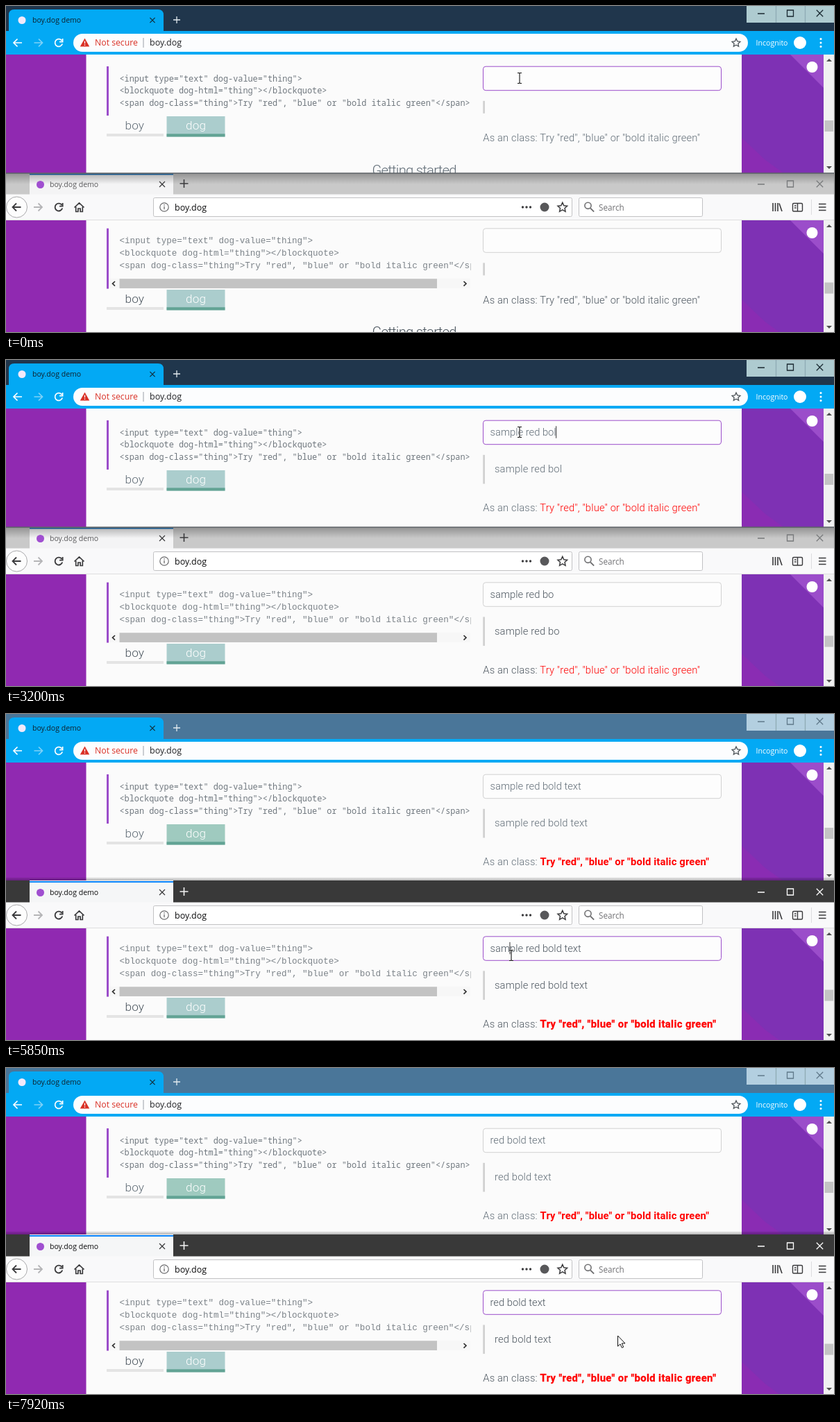
An HTML page for the animation above (8000 ms loop, 1193x470 px).

```html
<!DOCTYPE html>
<html lang="en">
<head>
<meta charset="utf-8">
<title>boy.dog demo</title>
<style>
html, body { margin: 0; width: 100%; height: 100%; overflow: hidden; background: #fbfbfb; }
svg { display: block; width: 100vw; height: 100vh; }
text { white-space: pre; }
.ui { font-family: "Open Sans", "Noto Sans", sans-serif; }
.body { font: 300 14.75px Roboto, sans-serif; letter-spacing: .1475px; }
.field { font: 300 14.75px Roboto, sans-serif; }
.head { font: 300 20.24px Roboto, sans-serif; letter-spacing: -.74px; }
.tab { font: 300 17.2px Roboto, sans-serif; letter-spacing: .17px; }
.mono { font: 11.87px "Noto Sans Mono", monospace; }
.courier { font: 12.55px "Liberation Mono", monospace; }
.line { fill: none; stroke-width: 1.3; }
</style>
</head>
<body>
<svg id="stage" viewBox="0 0 1193 470" preserveAspectRatio="none"></svg>
<script>
const LOOP = 8000;
const PHRASE = 'sample red bold text';
const HINT = 'Try "red", "blue" or "bold italic green"';
const CODE = [
  '<input type="text" dog-value="thing">',
  '<blockquote dog-html="thing"></blockquote>',
  `<span dog-class="thing">${HINT}</span>`
];

// Key press times: typing in the upper window, mirrored below; deleting the other way round.
const topKeys = [680, 1000, 1160, 1320, 1490, 1650, 1770, 1920, 2070, 2230, 2380,
  2930, 3080, 3200, 3350, 3500, 3700, 3840, 4260, 4380];
const lowKeys = [840, ...topKeys.slice(2, 11), 2530, ...topKeys.slice(12, 18), 3990, 4380, 4380];
const lowCuts = [6990, 7110, 7230, 7380, 7500, 7620, 7770];
const topCuts = [...lowCuts.slice(1), 7920];
const FOCUS = 5850;

// time, x, y, shape
const mouse = [
  [0, 740, 104, 'beam'], [5310, 741, 150, 'arrow'], [5450, 735, 238, 'arrow'],
  [5580, 730, 310, 'arrow'], [5700, 728, 348, 'beam'],
  [6100, 812, 368, 'arrow'], [6250, 881.5, 386, 'arrow']
];

const esc = s => s.replace(/&/g, '&amp;').replace(/</g, '&lt;');
const rect = (x, y, w, h, fill, more = '') =>
  `<rect x="${x}" y="${y}" width="${w}" height="${h}" fill="${fill}" ${more}/>`;
const text = (x, y, s, cls, fill, more = '') =>
  `<text x="${x}" y="${y}" class="${cls}" fill="${fill}" ${more}>${esc(s)}</text>`;
const ui = (x, y, s, size, fill, more = '') =>
  text(x, y, s, 'ui', fill, `font-size="${size}" ${more}`);
const line = (d, stroke, more = '') => `<path class="line" d="${d}" stroke="${stroke}" ${more}/>`;
const dot = (x, y, r, fill) => `<circle cx="${x}" cy="${y}" r="${r}" fill="${fill}"/>`;
const cross = (x, y, r) => `M${x - r},${y - r}l${2 * r},${2 * r}m0,${-2 * r}l${-2 * r},${2 * r}`;
const plus = (x, y, r) => `M${x - r},${y}h${2 * r}M${x},${y - r}v${2 * r}`;
const back = (x, y) => `M${x + 6},${y}h-12m5.5,-5.5l-5.5,5.5l5.5,5.5`;
const forward = (x, y) => `M${x - 6},${y}h12m-5.5,-5.5l5.5,5.5l-5.5,5.5`;
const reload = (x, y) => `M${x + 4.5},${y - 3}A5.4,5.4 0 1 0 ${x + 5.2},${y + 1.5}M${x + 5.6},${y - 6}v4.6h-4.6`;

function star(x, y, r) {
  const pts = Array.from({ length: 10 }, (_, i) => {
    const a = i * Math.PI / 5, q = i % 2 ? r * .48 : r;
    return `${(x + q * Math.sin(a)).toFixed(2)},${(y - q * Math.cos(a)).toFixed(2)}`;
  });
  return `M${pts.join('L')}Z`;
}

const winGlyphs = y =>
  `M1083,${y + .5}h10M1125.5,${y - 4.5}h9v9h-9z${cross(1172.5, y, 4.7)}`;

function page(id, top, bottom, dy, o) {
  const h = bottom - top;
  const tabs = o.tabs;
  return `
    ${rect(0, top, 1193, h, '#fbfbfb')}
    ${rect(0, top, 115.5, h, '#9029b1')}
    ${rect(1060, top, 118, h, '#7e31b4')}
    <path d="M1060,${190 + dy}l34,32l36,26h-70z" fill="#8a2cb3"/>
    <path d="M1130,${top}h48v48z" fill="#9b4dca"/>
    ${dot(1161.5, top + 18, 8, '#fff')}
    ${rect(1178, top, 15, h, '#f1f1f1')}
    <path d="M1182,${top + 10}l4,-4l4,4z" fill="#505050"/>
    <path d="M1182,${o.down}l4,4l4,-4z" fill="#505050"/>
    ${rect(1179.5, 165 + dy, 12.5, 16, '#c4c4c4', `id="${id}Thumb"`)}
    ${rect(145, 87 + dy, 3, o.preH, '#9b4dca')}
    <svg x="0" y="0" width="669.5" height="470">
      ${CODE.map((s, i) => text(163.5, 108.6 + dy + i * 17.8 + o.codeShift, s, o.font, o.codeInk)).join('')}
    </svg>
    ${rect(145, tabs + 25, 82, 4, '#e4e4e4')}
    ${rect(231.5, tabs, 84, 29.5, '#abcdcd', `id="${id}Tab"`)}
    ${rect(231.5, tabs + 25.3, 84, 4.2, '#62a394')}
    ${text(171.5, tabs + 19, 'boy', 'tab', o.ink)}
    ${text(259, tabs + 19, 'dog', 'tab', '#fff')}
    ${rect(687.5, 87.2 + dy, 343, 34.5, '#fdfdfd', `rx="3.7" stroke="#d1d1d1" id="${id}Box"`)}
    ${text(697.5, 109 + dy, '', 'field', o.ink, `id="${id}Field"`)}
    <path id="${id}Wave" fill="none" stroke="#e53935" stroke-width="1"/>
    ${rect(697, 95.3 + dy, 1, 17.4, '#333', `id="${id}Caret"`)}
    ${rect(687.2, 136.8 + dy, 2.8, 18, '#d1d1d1', `id="${id}Bar"`)}
    ${text(704, 162.4 + dy, '', 'body', o.ink, `id="${id}Quote"`)}
    <g id="${id}Flow">
      <text x="687.3" y="${195 + dy}" class="body" fill="${o.ink}">As an class: <tspan id="${id}Hint">${HINT}</tspan></text>
      ${text(527.5, 243.8 + dy, 'Getting started', 'head', o.ink)}
    </g>`;
}

function topWindow() {
  return `
    ${rect(0, 0, 1193, 37, '#20364c', 'id="topTitle"')}
    <path d="M4,37V13q0,-8 8,-8H219q8,0 8,8V37z" fill="#03a9f4"/>
    ${rect(0, 36, 1193, 34, '#03a9f4')}
    ${dot(23, 20.5, 5.5, '#f3e9fa')}
    ${ui(38, 24.3, 'boy.dog demo', 10.55, '#10222e')}
    ${line(cross(211, 20.5, 3.6), '#12303f')}
    ${line(plus(246, 20, 5), '#e3ebf0')}
    ${rect(1067, 0, 126, 24, '#aecbd0', 'id="winBtns"')}
    ${line('M1109.5,0v24M1151.5,0v24', '#8fabb4', 'stroke-width="1"')}
    <path class="line" id="topGlyphs" d="${winGlyphs(10.5)}"/>
    ${line(back(17, 53), '#fff', 'style="stroke-width:1.7"')}
    ${line(forward(46.5, 53), '#7fd2f8', 'style="stroke-width:1.7"')}
    ${line(reload(76, 53), '#fff', 'style="stroke-width:1.7"')}
    ${rect(97, 40, 972, 26, '#fcfdfe', 'rx="13"')}
    <path d="M113.5,46.5l6.7,12h-13.4z" fill="#d93025"/>
    ${line('M113.5,50.6v3.6M113.5,55.4v1.5', '#fff')}
    ${ui(128, 57.4, 'Not secure', 12.25, '#d93025')}
    ${rect(197.5, 46, 1, 14, '#9aa0a6')}
    ${ui(207, 57.4, 'boy.dog', 12.5, '#202124')}
    ${line(star(1052, 53.3, 6.2), '#4d5358')}
    ${ui(1080.5, 56.8, 'Incognito', 10.6, '#fff')}
    ${dot(1144, 53, 9, '#fff')}
    ${[47.5, 53, 58.5].map(y => dot(1174, y, 1.5, '#fff')).join('')}
    ${page('top', 70, 241, 0, {
      tabs: 159, preH: 71, down: 231, font: 'mono', codeShift: 0,
      ink: '#606c76', codeInk: '#6f777e'
    })}`;
}

function lowWindow() {
  const ink = '#3b3b3d';
  return `
    <g id="lowOff">
      ${rect(0, 241, 1193, 31, '#c9c9c9')}
      ${rect(34, 242, 207, 30, '#f4f4f5')}
      ${rect(34, 242, 207, 1.5, '#1c72b8')}
      ${rect(0, 242, 1193, 15, 'url(#shade)')}
      ${rect(0, 240.3, 1193, 1.6, '#5d6266')}
    </g>
    <g id="lowOn">
      ${rect(0, 235.5, 1193, 4.5, 'url(#edge)')}
      ${rect(0, 240, 1193, 32, '#393939')}
      ${rect(34, 240, 207, 32, '#f5f6f7')}
      ${rect(34, 241, 207, 2, '#0a84ff')}
    </g>
    ${dot(49.5, 257.5, 5.5, '#a04fd0')}
    ${ui(63, 261.3, 'boy.dog demo', 10.55, '#555', 'id="lowTitle"')}
    ${line(cross(225, 257, 4), '#3c3c3e')}
    <path class="line" id="lowPlus" d="${plus(256.5, 256, 6)}" style="stroke-width:1.6"/>
    <path class="line" id="lowGlyphs" d="${winGlyphs(256.5)}"/>
    ${rect(0, 271.5, 1193, 38, '#f9f9fa')}
    ${rect(0, 308.3, 1193, 1, '#d4d4d6')}
    <circle cx="15.5" cy="290" r="15" fill="#fdfdfd" stroke="#a9a9ab"/>
    ${line(back(15.5, 290), ink, 'style="stroke-width:1.8"')}
    ${line(forward(46, 290), '#b5b5b7', 'style="stroke-width:1.8"')}
    ${line(reload(76, 290), ink, 'style="stroke-width:1.9"')}
    ${line('M98.5,290.5l7,-6.5l7,6.5M100.7,289.5v7h3.2v-4.5h3.2v4.5h3.2v-7', ink, 'style="stroke-width:1.7"')}
    ${rect(212.5, 276.5, 603, 27, '#fff', 'rx="2" stroke="#c2c2c4"')}
    <circle cx="228" cy="290" r="6.2" fill="none" stroke="#6a6a6c" stroke-width="1.2"/>
    ${line('M228,288.8v4.4M228,286v1.5', '#6a6a6c')}
    ${ui(243, 295.2, 'boy.dog', 12.5, '#0c0c0d')}
    ${[744.5, 750, 755.5].map(x => dot(x, 290, 1.7, ink)).join('')}
    ${dot(776, 290, 6.5, '#58585a')}
    ${line(star(801.8, 290.5, 7.2), ink, 'style="stroke-width:1.5"')}
    ${rect(825.5, 276.5, 178, 27, '#fff', 'rx="2" stroke="#c2c2c4"')}
    <circle cx="838.5" cy="287.8" r="4.6" fill="none" stroke="#707072" stroke-width="1.6"/>
    ${line('M842,291.5l5.2,5.2', '#707072', 'style="stroke-width:1.8"')}
    ${ui(854, 295, 'Search', 11.7, '#707073')}
    ${line('M1105,284v12M1108.5,284v12M1112,284v12M1114,284.5l4,11.5', ink, 'style="stroke-width:1.6"')}
    ${line('M1135,284.5h11q1.5,0 1.5,1.5v8.500q0,1.500 -1.500,1.500h-11q-1.500,0 -1.500,-1.500v-8.500q0,-1.500 1.500,-1.500zM1140.500,284.500v11.500M1136,288h2.500M1136,291h2.500', ink, 'style="stroke-width:1.4"')}
    ${rect(1160, 279, 1, 22, '#dcdcde')}
    ${line('M1171,285.5h10.500M1171,290h10.500M1171,294.500h10.500', ink, 'style="stroke-width:1.7"')}
    ${page('low', 309, 470, 233.6, {
      tabs: 409, preH: 87, down: 461, font: 'courier', codeShift: 0.2,
      ink: '#4b555e', codeInk: '#7b8288'
    })}
    ${rect(148, 393, 521, 14, '#f7f7f7')}
    ${rect(163.5, 393.3, 457.500, 13.700, '#c3c3c3')}
    ${line('M157,397l-3.500,3.300l3.500,3.300M659.500,397l3.500,3.300l-3.500,3.300', '#333', 'style="stroke-width:1.700"')}`;
}

const stage = document.getElementById('stage');
stage.innerHTML = `
  <defs>
    <linearGradient id="shade" x2="0" y2="1">
      <stop offset="0" stop-color="#000" stop-opacity=".26"/>
      <stop offset="1" stop-color="#000" stop-opacity="0"/>
    </linearGradient>
    <linearGradient id="edge" x2="0" y2="1">
      <stop offset="0" stop-color="#000" stop-opacity=".06"/>
      <stop offset="1" stop-color="#000" stop-opacity=".28"/>
    </linearGradient>
  </defs>
  ${topWindow()}${lowWindow()}
  <g id="beam">
    ${line('M-3,-7.500h2.200l.8,.8l.8,-.8h2.200M0,-7v14M-3,7.500h2.200l.8,-.8l.8,.8h2.200', '#fff', 'style="stroke-width:2.400" opacity=".7"')}
    ${line('M-3,-7.500h2.200l.8,.8l.8,-.8h2.200M0,-7v14M-3,7.500h2.200l.8,-.8l.8,.8h2.200', '#111', 'style="stroke-width:1.100"')}
  </g>
  <path id="arrow" d="M0,0v15.200l3.500,-3.300l2.400,5.400l2.300,-1l-2.400,-5.300h4.700z" fill="#fff" stroke="#111"/>`;

const el = {};
stage.querySelectorAll('[id]').forEach(n => el[n.id] = n);
const set = (id, name, value) => el[id].setAttribute(name, value);
const show = (id, on) => set(id, 'visibility', on ? 'visible' : 'hidden');
const passed = (times, t) => times.filter(x => x <= t).length;
const typed = (keys, cuts, t) => PHRASE.slice(passed(cuts, t), passed(keys, t));

const pen = document.createElement('canvas').getContext('2d');
function widthOf(s) {
  pen.font = '300 14.75px Roboto, sans-serif';
  return pen.measureText(s).width;
}

function drawPage(id, s, dy, focused) {
  const words = s.split(' ');
  const bold = words.includes('bold');
  const filled = s !== '';
  el[id + 'Field'].textContent = s;
  el[id + 'Quote'].textContent = s.trimStart();
  set(id + 'Box', 'stroke', focused ? '#9b4dca' : '#d1d1d1');
  set(id + 'Bar', 'height', filled ? 41.7 : 18);
  set(id + 'Thumb', 'y', (filled ? 164 : 165) + dy);
  set(id + 'Flow', 'transform', `translate(0 ${filled ? 23.4 : 0})`);
  const hint = el[id + 'Hint'].style;
  hint.fill = words.includes('red') ? '#f00' : '';
  hint.fontWeight = bold ? 700 : 300;
  // The lower browser thickens and widens its bold text.
  const heavy = bold && id === 'low';
  hint.letterSpacing = heavy ? '.4px' : '';
  hint.stroke = heavy ? '#f00' : 'none';
  hint.strokeWidth = '.3px';
}

function drawWave(s, t) {
  const on = t >= 7230 && t < 7620;
  show('topWave', on);
  if (!on) return;
  const w = widthOf(s.split(' ')[0]);
  let d = 'M697.5,112.5';
  for (let x = 2, up = true; x <= w; x += 2, up = !up) d += `l2,${up ? -2 : 2}`;
  set('topWave', 'd', d);
}

function render(t) {
  const active = t >= FOCUS;
  const top = typed(topKeys, topCuts, t);
  const low = typed(lowKeys, lowCuts, t);
  drawPage('top', top, 0, !active);
  drawPage('low', low, 233.6, active);
  drawWave(top, t);

  show('topCaret', !active && t >= 250 && !(t >= 4750 && t < 5310));
  set('topCaret', 'x', 697 + widthOf(top));
  show('lowCaret', active && t < 7920 && !(t >= 6370 && t < 6680));
  set('lowCaret', 'x', 697 + (t < 6370 ? widthOf('sam') : 0));

  show('lowOff', !active);
  show('lowOn', active);
  set('topTitle', 'fill', active ? '#4a7699' : '#20364c');
  set('winBtns', 'fill', active ? '#b3cfe0' : '#aecbd0');
  set('topGlyphs', 'stroke', active ? '#60798a' : '#1a2931');
  set('topTab', 'fill', active ? '#9fcabf' : '#abcdcd');
  set('lowTitle', 'fill', active ? '#0c0c0d' : '#58585a');
  set('lowPlus', 'stroke', active ? '#f2f2f2' : '#3a3a3c');
  set('lowGlyphs', 'stroke', active ? '#fff' : '#77797b');

  const [, x, y, shape] = mouse[passed(mouse.map(m => m[0]), t) - 1];
  for (const id of ['beam', 'arrow']) {
    show(id, id === shape);
    set(id, 'transform', `translate(${x} ${y})`);
  }
}

const start = performance.now();
function tick() {
  render((performance.now() - start) % LOOP);
  requestAnimationFrame(tick);
}
tick();
</script>
</body>
</html>
```
